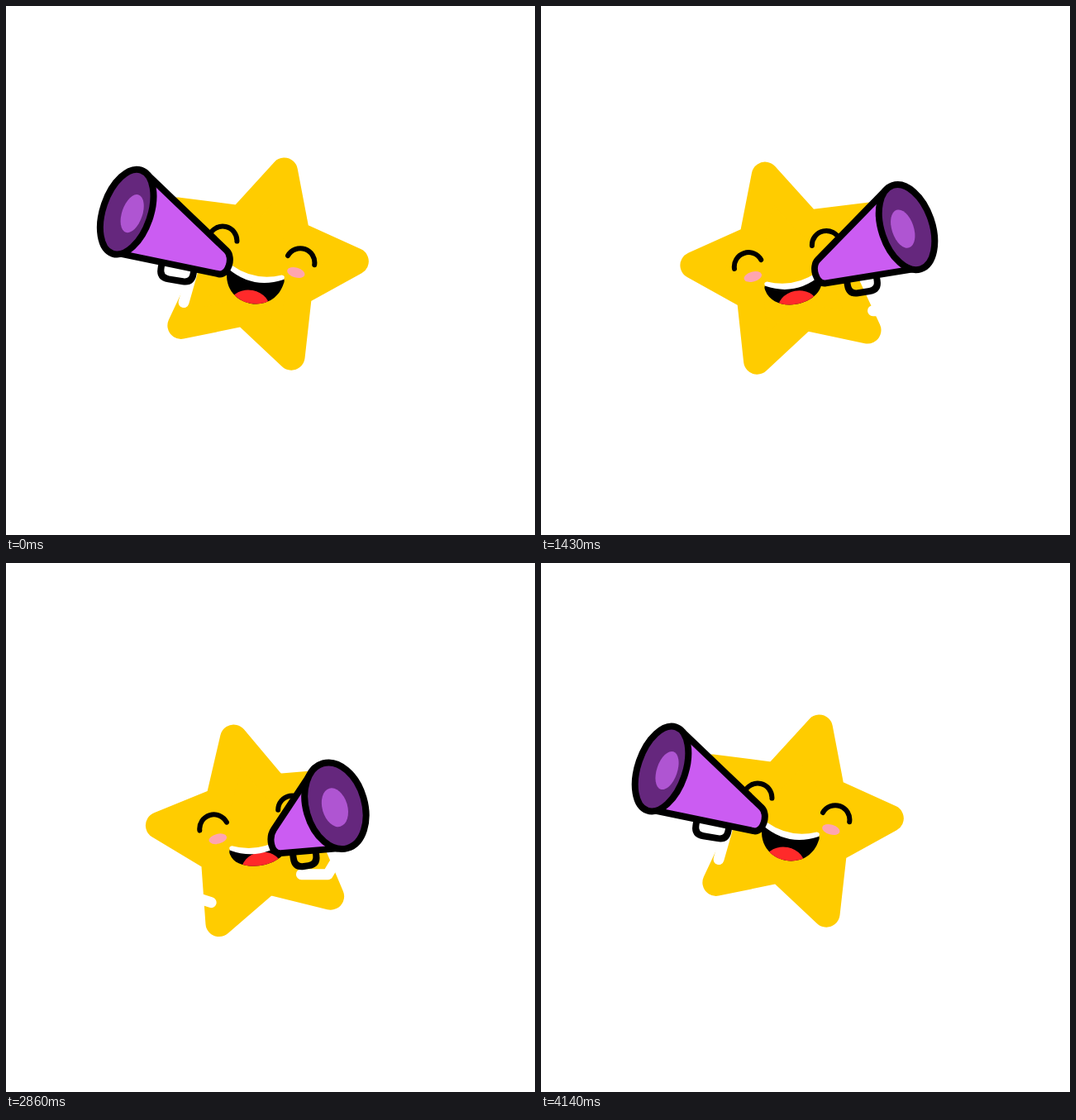
An HTML page for the animation above (4.21 s loop, 640 px wide and 640 px high).

```html
<!DOCTYPE html>
<html lang="en">
<head>
<meta charset="utf-8">
<title>Star with megaphone</title>
<style>
  html, body { margin: 0; width: 100%; height: 100%; overflow: hidden; background: #fff; }
  svg { display: block; width: 100vw; height: 100vh; }
  .line { fill: none; stroke: #000; stroke-linecap: round; stroke-linejoin: round; }
  .arm { fill: none; stroke: #fff; stroke-width: 13; stroke-linecap: round; stroke-linejoin: round; }
</style>
</head>
<body>
<svg viewBox="0 0 640 640">
  <defs><clipPath id="mouthClip"><path id="clipShape"/></clipPath></defs>
  <g id="body">
    <path id="star" fill="#fc0" stroke="#fc0" stroke-width="32.8" stroke-linejoin="round"/>
    <g fill="#ffa5b0">
      <ellipse cx="-47" cy="-4" rx="11" ry="6"/>
      <ellipse cx="47" cy="-4" rx="11" ry="6"/>
    </g>
    <path class="line" stroke-width="6" d="M-66-19A17.3 17.3 0 0 1-32-21M32-21A17.3 17.3 0 0 1 66-19"/>
  </g>
  <g id="mouth">
    <path id="mouthShape"/>
    <ellipse id="tongue" rx="24" ry="19" fill="#ff2a2a" clip-path="url(#mouthClip)"/>
    <path fill="#fff" d="M-31-4Q0 10 31-4Q36-4 34 1Q0 20-34 1Q-36-4-31-4Z"/>
  </g>
  <path id="holdingArm" class="arm"/>
  <path id="freeArm" class="arm"/>
  <path id="handle" class="line" stroke-width="8"/>
  <path id="cone" class="line" stroke-width="8" style="fill:#cb5cf2"/>
  <ellipse id="bell" fill="#65277d" stroke="#000" stroke-width="8"/>
  <ellipse id="core" fill="#af55d2"/>
</svg>
<script>
const LOOP = 4210, FRAMES = 59;
const $ = id => document.getElementById(id);
const set = (id, attrs) => {
  for (const name in attrs) $(id).setAttribute(name, attrs[name]);
};
const clamp = (v, lo, hi) => Math.max(lo, Math.min(hi, v));
const lerp = (a, b, u) => a + (b - a) * u;

// 1 faces left, -1 faces right; quickest while facing the viewer
function turnAt(t) {
  const x = clamp((t < 2000 ? 970 - t : t - 3100) / 1080, -1, 1);
  return Math.sign(x) * (1 - (1 - Math.abs(x)) ** 3);
}

function starPath() {
  const points = Array.from({ length: 10 }, (_, i) => {
    const r = i % 2 ? 59.5 : 118, a = i * Math.PI / 5;
    return [r * Math.sin(a), -r * Math.cos(a)];
  });
  return 'M' + points.join('L') + 'Z';
}

function drawMouth(x, y, tilt, height) {
  const k = (height - 1.5) / 0.75;
  const d = `M-34 0Q0 18 34 0Q36 2 35 6C30 ${k}-30 ${k}-35 6Q-36 2-34 0Z`;
  set('mouthShape', { d });
  set('clipShape', { d });
  set('tongue', { cy: height + 3 });
  set('mouth', {
    transform: `translate(${x - tilt * 0.12} ${y + 24 - 0.38 * height}) rotate(${tilt * 0.7})`
  });
}

function drawArms(x, y, turn) {
  const reach = 164 * Math.max(0, Math.abs(turn) - 0.5);
  set('holdingArm', {
    d: turn > 0
      ? `M215 ${y + 45}L225 ${y + 10}`
      : `M${351 + reach} ${y + 50}h32l9-15`
  });
  const side = turn > 0 ? 1 : -1, hand = 51 + reach * 0.6;
  set('freeArm', { d: `M${x + side * hand} ${y + 84}l${side * 28}-9` });
}

function drawMegaphone(turn, tilt, bx, by, tx, ty) {
  const a = tilt * Math.PI / 180, cos = Math.cos(a), sin = Math.sin(a);
  const place = (x, y, dx, dy) => [x + dx * cos - dy * sin, y + dx * sin + dy * cos];
  const extend = ([x0, y0], [x, y], by) => {
    const d = Math.hypot(x - x0, y - y0);
    return [x + (x - x0) / d * by, y + (y - y0) / d * by];
  };
  const side = clamp(turn * 2.7, -1, 1);
  const rx = 45.7 - 0.146 * Math.abs(bx - tx), ry = 53.4;
  const bellTop = place(bx, by, side * rx * 0.35, -ry * 0.94);
  const bellEnd = place(bx, by, side * rx * 0.35, ry * 0.94);
  const tipTop = place(tx, ty, 0, -15), tipEnd = place(tx, ty, 0, 15);
  set('cone', {
    d: `M${bellTop}L${tipTop}C${extend(bellTop, tipTop, 12)} ${extend(bellEnd, tipEnd, 12)} ${tipEnd}L${bellEnd}Z`
  });

  const w = 6 + 0.115 * Math.hypot(tipEnd[0] - bellEnd[0], tipEnd[1] - bellEnd[1]);
  const hx = lerp(bellEnd[0], tipEnd[0], 0.58), hy = lerp(bellEnd[1], tipEnd[1], 0.58) + 3;
  set('handle', {
    d: `M${-w}-3V4Q${-w} 15 ${11 - w} 15H${w - 11}Q${w} 15 ${w} 4V-3`,
    transform: `translate(${hx} ${hy}) rotate(${tilt / 2})`
  });

  set('bell', { rx, ry, transform: `translate(${bx} ${by}) rotate(${tilt})` });
  set('core', {
    rx: rx * 0.43, ry: 24,
    transform: `translate(${bx + side * (36 - rx) * 0.9} ${by + 2}) rotate(${tilt})`
  });
}

function draw(t) {
  const turn = turnAt(t), front = 1 - Math.abs(turn);
  const x = 303.5 + turn, y = 313.5 + 27 * front + 16 * front ** 4;
  const tilt = 15.8 * Math.sign(turn) * (1 - front ** 2.5);
  set('body', { transform: `translate(${x} ${y}) rotate(${tilt})` });
  drawMouth(x, y, tilt, 24 + 13 * turn ** 4);
  drawArms(x, y, turn);
  drawMegaphone(turn, tilt * 1.2,
    310 - 164 * turn, 249 + 97 * front,
    305 - 43 * turn, 310 + 58 * front);
}

set('star', { d: starPath() });
const frameTime = LOOP / FRAMES;
let start;
function tick(now) {
  start ??= now;
  const t = (now - start) % LOOP;
  draw(Math.min(FRAMES - 1, Math.floor((t + 3) / frameTime)) * frameTime);
  requestAnimationFrame(tick);
}
draw(0);
requestAnimationFrame(tick);
</script>
</body>
</html>
```
